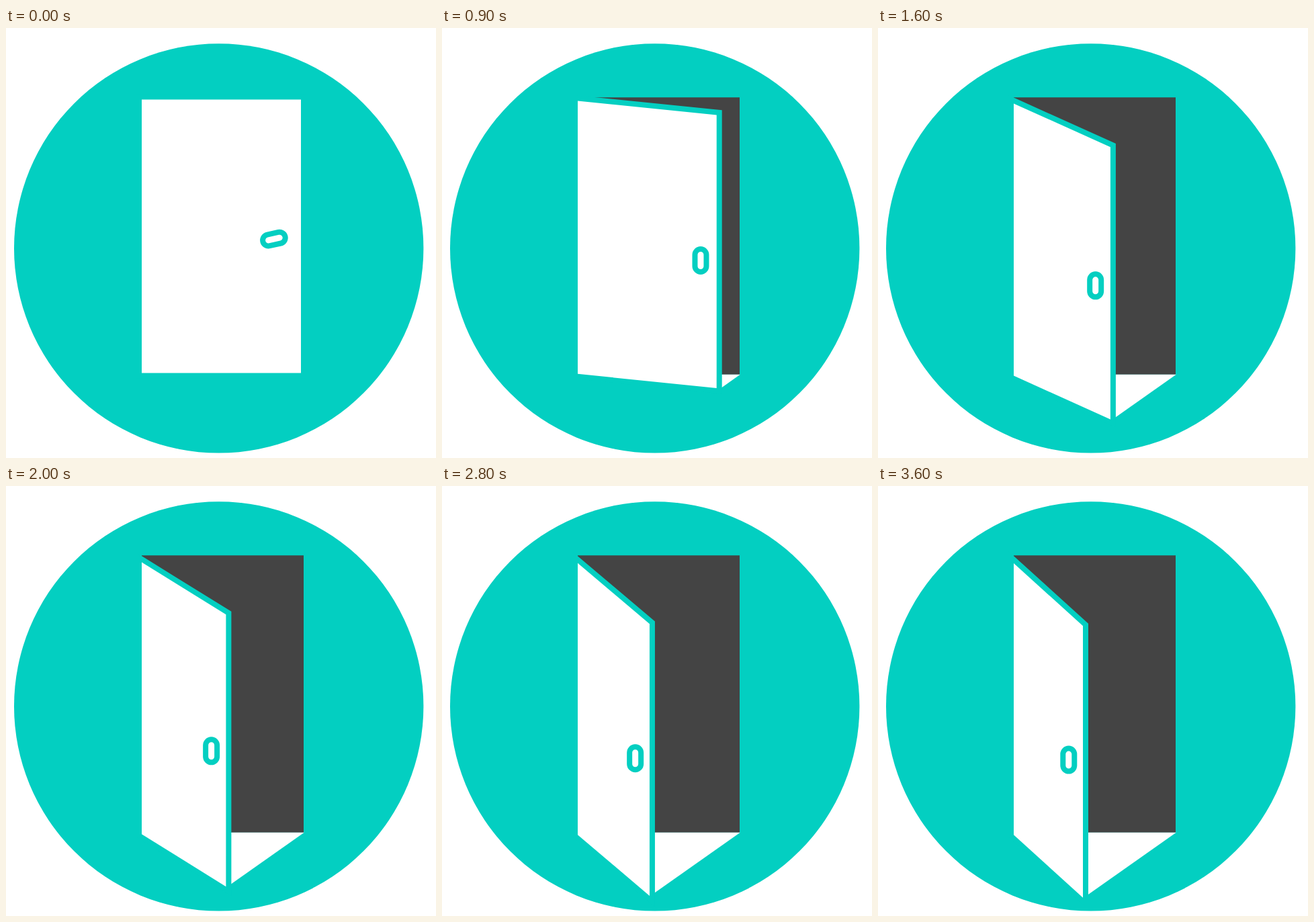
Animation of 640x640 px, one loop 4800 ms. Source, as an HTML page:

```html
<!DOCTYPE html>
<html lang="en">
<head>
<meta charset="utf-8">
<title>Opening door</title>
<style>
  html, body { margin: 0; width: 100%; height: 100%; overflow: hidden; background: #fff; }
  svg { display: block; width: 100%; height: 100%; }
</style>
</head>
<body>
<svg viewBox="0 0 640 640">
  <circle cx="316.7" cy="327.9" r="304.7" fill="#03cfc1"/>
  <rect x="202" y="103.3" width="241" height="412.5" fill="#444"/>
  <polygon id="floor" fill="#fff"/>
  <polygon id="door" fill="#fff" stroke="#03cfc1" stroke-width="16" stroke-miterlimit="10" paint-order="stroke"/>
  <rect id="handle" x="-8.5" y="-17" width="17" height="34" rx="8.5" fill="none" stroke="#03cfc1" stroke-width="8"/>
</svg>
<script>
const LOOP = 4800, STEP = 100, LAST = 3600;
const SWING_START = 558, SWING_TIME = 2930, TURN_TIME = 580;
const [floor, door, handle] = ['floor', 'door', 'handle'].map(id => document.getElementById(id));

const clamp = v => Math.min(1, Math.max(0, v));
const mix = (a, b, p) => a + (b - a) * p;
const smooth = u => u * u * (3 - 2 * u);

// Cubic bezier easing with flat ends; x1 and x2 are the control times.
function ease(x, x1, x2) {
  let lo = 0, hi = 1;
  for (let i = 0; i < 30; i++) {
    const s = (lo + hi) / 2, r = 1 - s;
    if (3 * x1 * s * r * r + 3 * x2 * s * s * r + s * s * s < x) lo = s;
    else hi = s;
  }
  return smooth((lo + hi) / 2);
}

function setPoints(el, points) {
  el.setAttribute('points', points.map(p => p.map(v => v.toFixed(2)).join()).join(' '));
}

function draw(time) {
  const t = Math.min(LAST, Math.floor((time % LOOP) / STEP) * STEP);

  const u = clamp((t - SWING_START) / SWING_TIME);
  const p = u === 0 || u === 1 ? u : ease(u, 0.128, 0.157);
  const right = mix(439, 305, p);
  setPoints(door, [
    [202, mix(106.5, 115, p)],
    [right, mix(106.5, 208.3, p)],
    [right, mix(513.5, 612.8, p)],
    [202, mix(513.5, 519.3, p)]
  ]);

  // Light on the floor, cut off by the door's outline.
  const edge = Math.min(right + 4, 443.8);
  setPoints(floor, [[443.8, 515.8], [edge, 515.8], [edge, 515.8 + 0.704 * (443.8 - edge)]]);

  const angle = 90 * (1 - smooth(clamp(0.235 + 0.765 * t / TURN_TIME)));
  const x = 415.4 - 130.7 * p, y = 311.3 + 79.6 * p;
  handle.setAttribute('transform',
    `translate(${x.toFixed(2)} ${y.toFixed(2)}) rotate(${angle.toFixed(2)}) translate(-0.9 16.7)`);
}

const start = performance.now();
function tick() {
  draw(performance.now() - start);
  requestAnimationFrame(tick);
}
tick();
</script>
</body>
</html>
```
